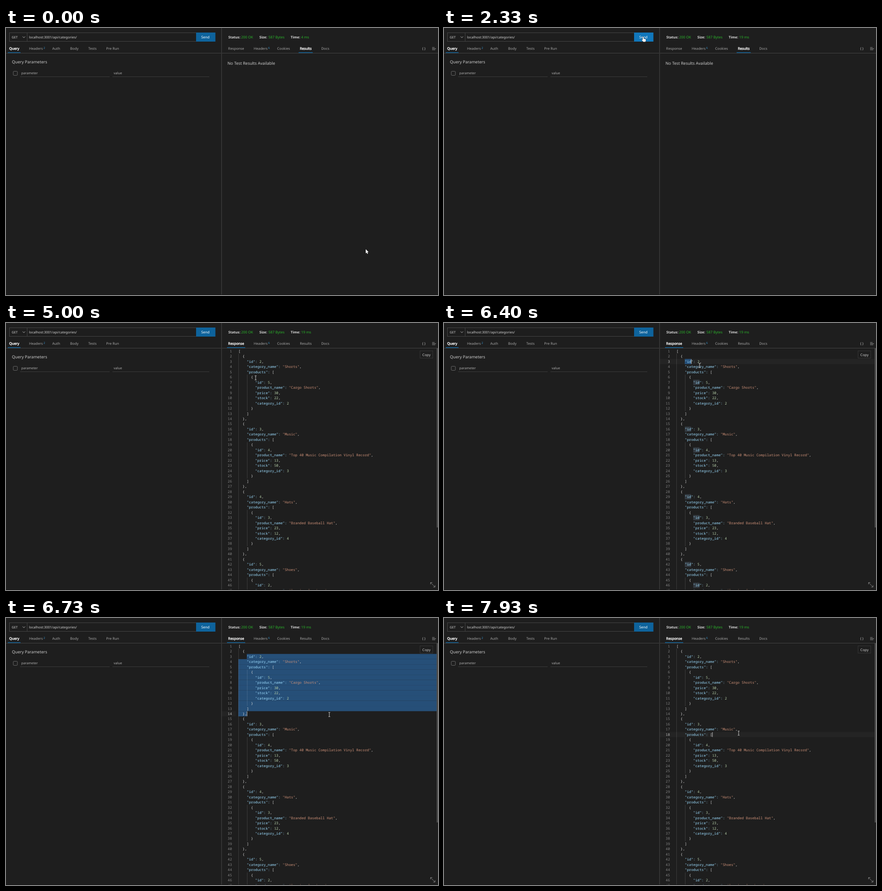
Recreate the animation shown at these times as an HTML page with a canvas. Size 950 by 589 pixels, loop 8000 ms.

```html
<!DOCTYPE html>
<html lang="en">
<head>
<meta charset="utf-8">
<title>API client</title>
<style>
  html, body { margin: 0; width: 100%; height: 100%; overflow: hidden; background: #1e1e1e; }
  canvas { display: block; }
</style>
</head>
<body>
<canvas id="stage" width="950" height="589"></canvas>
<script>
const ctx = document.getElementById('stage').getContext('2d');
ctx.textRendering = 'geometricPrecision';

const LOOP = 8000, TICK = 1000 / 15;
const UI = '"Noto Sans", "Open Sans", sans-serif';
const MONO = '500 7.73px "Noto Sans Mono", "DejaVu Sans Mono", monospace';
const BG = '#1e1e1e', LINE = '#444', BLUE = '#0e639c', GREEN = '#2bb52b';
const CODE_X = 511, CODE_Y = 56.3, ROW_H = 11.478;

// Moments at which the interface reacts
const URL_FOCUS = 1600, SEND_CLICK = 2200, SENT = 2270, OPEN_RESPONSE = 4200, EDITOR_HOVER = 4600,
      CARET = 5800, WORD = 6000, DRAG = 6450, DRAG_END = 6733, RECLICK = 7850;

// Pointer stops: time, x, y
const pointerPath = [
  [0, 791, 488], [600, 260, 85], [830, 260, 85], [1530, 173, 19], [1730, 176, 19],
  [2130, 438, 20], [3800, 438, 20], [3866, 481, 38], [4130, 514, 47], [4540, 514, 47],
  [4733, 535, 89], [4800, 535, 89], [5000, 549, 121], [5200, 614, 200], [5530, 533, 93],
  [5620, 533, 93], [5750, 530, 85], [5950, 530, 85], [6150, 544, 86], [6400, 562, 94],
  [6467, 585, 100], [6733, 711, 213], [6870, 711, 213], [7270, 640, 430],
  [7733, 652, 254], [7930, 648, 254], [8000, 648, 254]
];

const category = (id, category_name, productId, product_name, price, stock) => ({
  id, category_name,
  products: [{ id: productId, product_name, price, stock, category_id: id }]
});
const lines = JSON.stringify([
  category(2, 'Shorts', 5, 'Cargo Shorts', 30, 22),
  category(3, 'Music', 4, 'Top 40 Music Compilation Vinyl Record', 13, 50),
  category(4, 'Hats', 3, 'Branded Baseball Hat', 23, 12),
  category(5, 'Shoes', 2, 'Running Sneakers', 90, 25)
], null, 2).split('\n').slice(0, 47);

ctx.font = MONO;
const charW = ctx.measureText('0').width;
const colX = col => CODE_X + col * charW;
const rowY = row => CODE_Y + row * ROW_H;

function rect(x, y, w, h, color) {
  ctx.fillStyle = color;
  ctx.fillRect(x, y, w, h);
}

function frame(x, y, w, h, color) {
  ctx.strokeStyle = color;
  ctx.lineWidth = 1;
  ctx.strokeRect(x + .5, y + .5, w - 1, h - 1);
}

function text(str, x, y, size, color, weight = 400) {
  ctx.font = `${weight} ${size}px ${UI}`;
  ctx.fillStyle = color;
  ctx.fillText(str, x, y);
}

function stroke(path, color, width = 1) {
  ctx.strokeStyle = color;
  ctx.lineWidth = width;
  ctx.stroke(new Path2D(path));
}

function tab(label, x, active, left, width) {
  text(label, x, 48.2, 7.7, active ? '#fff' : '#a6a6a6');
  if (!active) return;
  ctx.lineWidth = .4;
  ctx.strokeStyle = '#fff';
  ctx.strokeText(label, x, 48.2);
  rect(left, 53.5, width, 1.5, BLUE);
}

function pointerAt(t) {
  const i = Math.max(1, pointerPath.findIndex(stop => stop[0] >= t));
  const [t0, x0, y0] = pointerPath[i - 1], [t1, x1, y1] = pointerPath[i];
  const u = (t - t0) / (t1 - t0), e = u * u * (3 - 2 * u);
  return { x: x0 + (x1 - x0) * e, y: y0 + (y1 - y0) * e };
}

function drawRequest(t, onSend) {
  frame(7, 10, 412, 20, t >= URL_FOCUS && t < SEND_CLICK ? '#007fd4' : '#454545');
  rect(46, 10, 1, 20, '#454545');
  text('GET', 12.5, 23.2, 7.2, '#ccc');
  stroke('M36.5 18.7l2.8 2.8l2.8-2.8', '#ccc', .9);
  text('localhost:3001/api/categories/', 50.5, 22.8, 7.4, '#d4d4d4');
  rect(418, 10, 42.5, 20, onSend ? '#1177bb' : BLUE);
  text('Send', 429.3, 23, 7.8, '#fff', 500);

  rect(0, 55, 473, 1, LINE);
  tab('Query', 7, true, 4, 28);
  tab('Headers', 50.7, false);
  text('2', 82.4, 46, 6, '#3794d0');
  tab('Auth', 101.8, false);
  tab('Body', 141, false);
  tab('Tests', 181, false);
  tab('Pre Run', 220.3, false);

  text('Query Parameters', 13, 78.4, 9.05, '#ccc', 300);
  ctx.strokeStyle = '#6b6b6b';
  ctx.lineWidth = 1;
  ctx.beginPath();
  ctx.roundRect(16, 95.5, 9, 9, 1.5);
  ctx.stroke();
  text('parameter', 33.7, 102.2, 7.3, '#b0b0b0');
  text('value', 236.7, 102.2, 7.3, '#b0b0b0');
  rect(31, 107, 197, 1, '#3c3c3c');
  rect(234, 107, 213, 1, '#3c3c3c');
}

function drawResponseHeader(t, opened) {
  const pairs = [['Status:', 489, '200 OK', 517], ['Size:', 557.3, '587 Bytes', 577],
                 ['Time:', 626, t < SENT ? '4 ms' : '19 ms', 649]];
  for (const [label, x, value, valueX] of pairs) {
    text(label, x, 23.3, 7.6, '#ddd', 600);
    text(value, valueX, 23.3, 7.8, GREEN, 500);
  }
  rect(475, 55, 475, 1, LINE);
  tab('Response', 488.6, opened, 486, 40);
  tab('Headers', 544.8, false);
  text('6', 576.4, 46, 6, '#3794d0');
  tab('Cookies', 596.2, false);
  tab('Results', 646.2, !opened, 643.5, 31);
  tab('Docs', 693.2, false);
  text('{ }', 915, 48, 7.6, '#bbb');
  stroke('M937 43h5.5M937 45.5h8.5M937 48h7', '#b0b0b0', .8);
}

function selectionAt(t) {
  const anchor = { row: 2, col: 4 };
  if (t < CARET) return null;
  if (t < WORD) return { start: anchor, end: anchor };
  if (t < DRAG) return { start: anchor, end: { row: 2, col: 7 }, word: true };
  const p = pointerAt(t < RECLICK ? Math.min(t, DRAG_END) : t);
  const row = Math.floor((p.y - CODE_Y) / ROW_H);
  const col = Math.min(lines[row].length, Math.round((p.x - CODE_X) / charW));
  const end = { row, col };
  return { start: t < RECLICK ? anchor : end, end };
}

function drawSelection({ start, end, word }) {
  const oneLine = start.row === end.row;
  rect(475, rowY(end.row), oneLine ? 472 : 30, ROW_H, '#242424');
  if (word) {
    lines.forEach((line, row) => {
      const col = line.indexOf('"id"');
      if (col >= 0) rect(colX(col), rowY(row), 3 * charW, ROW_H, '#343b42');
    });
  }
  if (start === end) return;
  for (let row = start.row; row <= end.row; row++) {
    const left = row === start.row ? colX(start.col) : CODE_X;
    const right = row === end.row ? colX(end.col) : 947;
    rect(left, rowY(row), right - left, ROW_H + .02, '#264f78');
  }
}

function drawCodeLine(line, row, active) {
  const indent = line.search(/\S/), baseline = rowY(row) + 8.5;
  for (let col = 0; col < indent; col += 4) {
    rect(Math.round(colX(col)), rowY(row), 1, ROW_H, 'rgba(255,255,255,.13)');
  }
  ctx.font = MONO;
  ctx.fillStyle = active ? '#c6c6c6' : '#858585';
  ctx.textAlign = 'right';
  ctx.fillText(row + 1, 496.8, baseline);
  ctx.textAlign = 'left';
  for (const token of line.matchAll(/"[^"]*"(:?)|\d+|[^"\d\s]+/g)) {
    const str = token[0];
    const isKey = str[0] === '"' && line[token.index + str.length - 1] === ':';
    ctx.fillStyle = isKey ? '#9cdcfe' : str[0] === '"' ? '#ce9178' : /\d/.test(str) ? '#b5cea8' : '#dcdcdc';
    ctx.fillText(str, colX(token.index), baseline);
  }
}

function drawEditor(t) {
  const selection = selectionAt(t);
  if (selection) drawSelection(selection);
  lines.forEach((line, row) => drawCodeLine(line, row, selection && selection.end.row === row));
  if (selection) rect(colX(selection.end.col), rowY(selection.end.row) + .5, 1, ROW_H - 1, '#d0d0d0');
  rect(947, 56, 3, 395, '#4b4b4b');
  stroke('M934 573l9 9M933.5 576.5v-4h4M939.5 582.5h4v-4', '#999', .8);
  if (t >= EDITOR_HOVER) {
    rect(910, 61, 29, 17, BG);
    frame(910, 61, 29, 17, '#353535');
    text('Copy', 915.6, 72.6, 7.7, '#ccc');
  }
}

function drawPointer({ x, y }, kind) {
  ctx.save();
  ctx.translate(x, y);
  if (kind === 'beam') {
    stroke('M-2 -4.7h1.3l.7 .6l.7-.6h1.3M0 -4.3v8.6M-2 4.7h1.3l.7-.6l.7 .6h1.3', '#e4e4e4', .9);
  } else {
    const shape = kind === 'hand'
      ? 'M-1 0q1-1 2 0v3.6l4 .9q1 .4 1 1.5l-.8 4.5h-5l-3.4-4.3q.2-1.2 2.2-.2z'
      : 'M0 0v9.2l2.1-2l1.5 3.3l1.6-.7l-1.5-3.2h2.9z';
    stroke(shape, '#000', 1);
    ctx.fillStyle = '#fff';
    ctx.fill(new Path2D(shape));
  }
  ctx.restore();
}

function draw(now) {
  const t = Math.floor((now % LOOP + 5) / TICK) * TICK % LOOP;
  const pointer = pointerAt(t), opened = t >= OPEN_RESPONSE;
  const inside = (x0, y0, x1, y1) => pointer.x > x0 && pointer.x < x1 && pointer.y > y0 && pointer.y < y1;
  const onSend = inside(418, 10, 460, 30);
  const onText = inside(47, 10, 418, 30) || opened && inside(505, 56, 947, 589);

  rect(0, 0, 950, 589, BG);
  drawRequest(t, onSend);
  drawResponseHeader(t, opened);
  if (opened) drawEditor(t);
  else text('No Test Results Available', 487, 81.2, 9, '#ccc', 300);
  rect(473.5, 0, 1, 589, '#4a4a4a');
  rect(0, 588, 950, 1, '#141414');
  drawPointer(pointer, onText ? 'beam' : onSend || inside(488, 38, 524, 54) ? 'hand' : 'arrow');
}

function loop() {
  draw(performance.now());
  requestAnimationFrame(loop);
}
loop();
</script>
</body>
</html>
```
